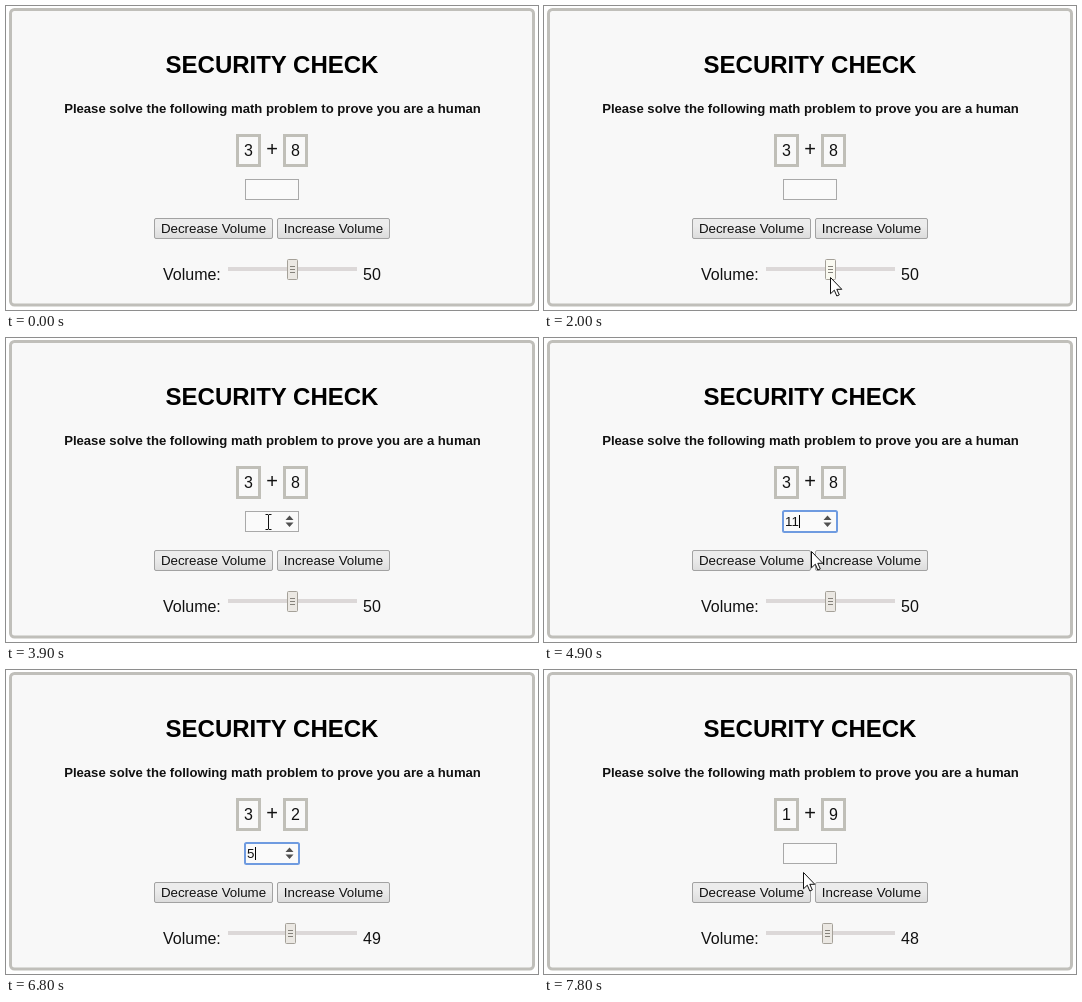
An HTML page that plays this animation: 532x304 px, repeating every 8 s.

```html
<!DOCTYPE html>
<html lang="en">
<head>
<meta charset="utf-8">
<title>Security check</title>
<style>
  html, body { margin: 0; width: 100%; height: 100%; overflow: hidden; background: #fff; }
  svg { display: block; font: 16px "Liberation Sans", Arial, sans-serif; fill: #111; }
  .mid { text-anchor: middle; }
  .small { font-size: 13.33px; }
  .box { fill: #f9f9f9; stroke: #c0bfb8; stroke-width: 3; }
  .btn { fill: url(#up); stroke: #a2a2a2; }
  .btn.hover { fill: url(#over); stroke: #8e8e8e; }
  .btn.down { fill: url(#down); stroke: #8e8e8e; }
  #field { fill: #fafafa; stroke: #a9a9a9; }
  #ring { fill: none; stroke: #6f9be0; stroke-width: 2; }
  #thumb rect { fill: #ebe8e3; stroke: #a5a199; }
  #thumb.hover rect { fill: #fafaf1; }
  #thumb path { stroke: #85827b; }
</style>
</head>
<body>
<svg width="532" height="304" viewBox="0 0 532 304">
  <defs>
    <linearGradient id="up" x2="0" y2="1"><stop offset=".38" stop-color="#ececec"/><stop offset="1" stop-color="#dcdcdc"/></linearGradient>
    <linearGradient id="over" x2="0" y2="1"><stop offset=".38" stop-color="#f1f1f1"/><stop offset="1" stop-color="#e4e4e4"/></linearGradient>
    <linearGradient id="down" x2="0" y2="1"><stop offset="0" stop-color="#d4d4d4"/><stop offset="1" stop-color="#e4e4e4"/></linearGradient>
  </defs>

  <rect x="4.5" y="3.5" width="523" height="295.500" rx="4" fill="#f8f8f8" stroke="#c0bfba" stroke-width="3"/>
  <text class="mid" x="266" y="67" font-size="24" font-weight="bold" fill="#000">SECURITY CHECK</text>
  <text class="mid" x="266.500" y="107" font-size="13.12" font-weight="bold">Please solve the following math problem to prove you are a human</text>

  <rect class="box" x="231.500" y="129.500" width="22" height="30"/>
  <rect class="box" x="278.500" y="129.500" width="22" height="30"/>
  <text class="mid" id="left" x="242.500" y="150"></text>
  <text class="mid" x="266" y="150" font-size="20">+</text>
  <text class="mid" id="right" x="289.500" y="150"></text>

  <rect id="field" x="239.500" y="173.500" width="53" height="20"/>
  <rect id="ring" x="239" y="173" width="54" height="21" rx="1.500"/>
  <text class="small" id="answer" x="241" y="188"></text>
  <path id="caret" d="M0 177v13" stroke="#000"/>
  <path id="spin" d="M279.500 182l4-4.500 4 4.500zM279.500 184.500l4 4.500 4-4.500z" fill="#505050"/>

  <rect class="btn" id="dec" x="148.500" y="212.500" width="118" height="20" rx="1.500"/>
  <rect class="btn" id="inc" x="271.500" y="212.500" width="112" height="20" rx="1.500"/>
  <text class="mid small" x="207.500" y="227">Decrease Volume</text>
  <text class="mid small" x="327.500" y="227">Increase Volume</text>

  <text x="157" y="274">Volume:</text>
  <rect x="222" y="261" width="129" height="4" fill="#dcd8d8"/>
  <g id="thumb">
    <rect x=".5" y="253.500" width="10" height="20" rx="1"/>
    <path d="M3 260.500h5m-5 3h5m-5 3h5"/>
  </g>
  <text id="volume" x="357" y="274"></text>

  <path id="arrow" d="M.5.5v16.300l3.800-3.600 2.500 5.800 2.500-1.100-2.500-5.600h5z" fill="#fff" stroke="#111"/>
  <path id="beam" d="M-3-7.500h2.500l.5.500.5-.5H3M0-7V7M-3 7.500h2.500L0 7l.5.500H3" fill="none" stroke="#111"/>
</svg>
<script>
  const LOOP = 8000, STEP = 100;
  const ui = {};
  document.querySelectorAll("svg [id]").forEach(el => ui[el.id] = el);

  // Pointer moves: start, end, x, y
  const start = [93, 300];
  const moves = [
    [700, 1200, 268, 280], [1200, 1400, 296, 277], [1400, 1700, 288, 275],
    [1800, 2000, 286, 271], [2100, 2300, 233, 268], [2300, 2500, 319, 268],
    [2600, 3100, 282, 269], [3300, 3900, 262, 184], [4100, 4300, 261, 182],
    [4700, 4900, 267, 213], [4900, 5000, 257, 223], [5400, 5800, 261, 194],
    [5900, 6100, 262, 185], [6900, 7100, 256, 217], [7600, 7800, 259, 202]
  ];

  // Values that hold from a given time on
  const problems = [[0, "38"], [5400, "32"], [7600, "19"]];
  const answers = [[0, ""], [4600, "1"], [4700, "11"], [5400, ""], [6800, "5"], [7600, ""]];
  const volumes = [[0, 50, 281], [5200, 49, 279], [7400, 48, 278]];

  const at = (rows, t) => rows.filter(r => r[0] <= t).pop();
  const during = (t, a, b) => t >= a && t < b;
  const show = (el, on) => el.style.display = on ? "" : "none";
  const put = (el, x, y) => el.setAttribute("transform", `translate(${x} ${y})`);
  const write = (el, s) => { if (el.textContent !== String(s)) el.textContent = s; };

  function pointer(t) {
    let [x, y] = start;
    for (const [a, b, tx, ty] of moves) {
      if (t <= a) break;
      const k = Math.min(1, (t - a) / (b - a));
      x += (tx - x) * k;
      y += (ty - y) * k;
    }
    return [Math.round(x), Math.round(y)];
  }

  function draw(t) {
    const [x, y] = pointer(t);
    const inside = (l, top, r, bottom) => x >= l && x < r && y >= top && y < bottom;
    const [, value, thumbX] = at(volumes, t);
    const problem = at(problems, t)[1];
    const answer = at(answers, t)[1];
    const focus = during(t, 4500, 5100) || during(t, 6700, 7200);
    const pressed = during(t, 5100, 5200) || during(t, 7200, 7400);
    const typing = during(t, 4600, 4800) || during(t, 6800, 7000);
    const onText = inside(239, 173, 293, 194);
    const visible = t >= 800 && !typing;

    write(ui.left, problem[0]);
    write(ui.right, problem[1]);
    write(ui.answer, answer);
    write(ui.volume, value);
    put(ui.thumb, thumbX, 0);
    put(ui.caret, answer.length > 1 ? 255.5 : 242.5 + 7 * answer.length, 0);
    show(ui.ring, focus);
    show(ui.caret, focus);
    show(ui.spin, focus || inside(239, 173, 293, 195));

    const dec = pressed ? "down" : inside(148, 212, 267, 233) ? "hover" : "";
    ui.dec.setAttribute("class", "btn " + dec);
    ui.inc.setAttribute("class", inside(271, 212, 384, 233) ? "btn hover" : "btn");
    const hot = during(t, 2100, 3300) || inside(thumbX, 253, thumbX + 11, 274);
    ui.thumb.setAttribute("class", hot ? "hover" : "");

    show(ui.arrow, visible && !onText);
    show(ui.beam, visible && onText);
    put(ui.arrow, x, y);
    put(ui.beam, x + 0.5, y);
  }

  function tick() {
    const t = performance.now() % LOOP;
    draw(Math.floor(t / STEP) * STEP);
    requestAnimationFrame(tick);
  }
  tick();
</script>
</body>
</html>
```
